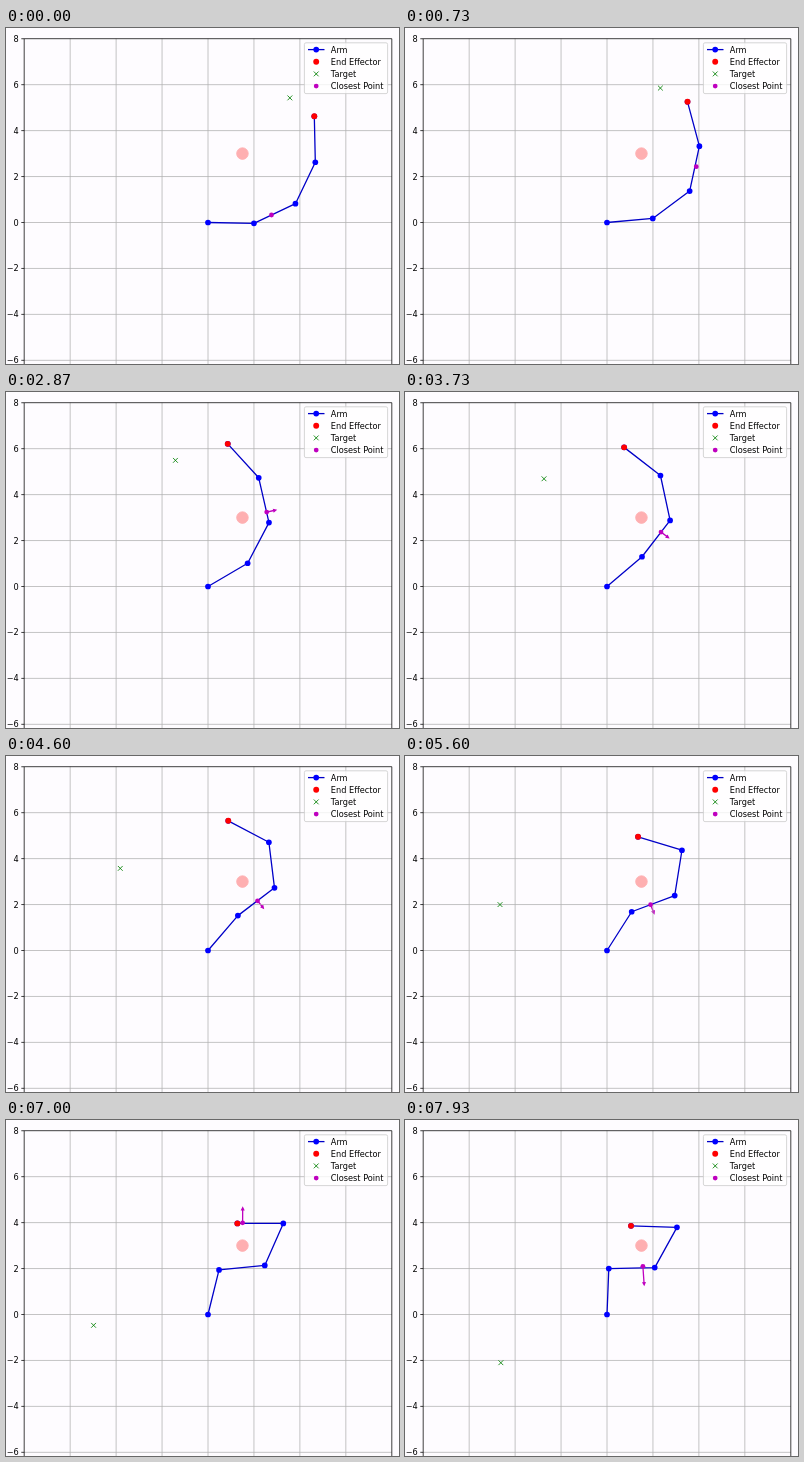
Animation of 393x336 px, one loop 8 s. Source, as an HTML page:

```html
<!DOCTYPE html>
<html lang="en">
<head>
<meta charset="utf-8">
<title>Arm avoiding an obstacle</title>
<style>
  html, body { margin: 0; width: 100%; height: 100%; overflow: hidden; background: #fefcff; }
  svg { display: block; }
  text { font: 8.2px "DejaVu Sans", sans-serif; fill: #000; }
  .grid { stroke: #b0b0b0; stroke-width: .75; }
  .axis { stroke: #000; stroke-width: .75; fill: none; }
  .tick { text-anchor: end; }
  .link { stroke: #0000c8; stroke-width: 1.3; fill: none; stroke-linejoin: round; }
  .joint { fill: #00f; }
  .tip { fill: #f00; }
  .near { fill: #bf00bf; }
  .cross { stroke: #008000; stroke-width: .85; }
  .push { stroke: #bf00bf; stroke-width: 1.3; fill: #bf00bf; }
  .obstacle { fill: #f00; stroke: #f00; stroke-width: .85; opacity: .3; }
  .frame { fill: #fff; fill-opacity: .8; stroke: #ccc; stroke-width: .8; }
</style>
</head>
<body>
<svg id="stage" width="393" height="336" viewBox="0 0 393 336"></svg>
<script>
const UNIT = 22.97, ORIGIN = { x: 202, y: 194.5 };
const LEFT = 18.2, RIGHT = 385.8, TOP = 10.7;
const LINK = 2 * UNIT, LOOP = 8000, STEPS = 120;
const CROSS = 'M-2.4-2.4 2.4 2.4M-2.4 2.4 2.4-2.4';
const FIRST_CONTACT = 105;

// Step, then the absolute angle of each link in degrees.
const POSES = [
  [0, -1, 25.3, 64.4, 91.25],
  [23, 12.5, 48.1, 90.9, 118.6],
  [43, 30.4, 62.3, 102.9, 132.4],
  [69, 49.4, 37.2, 97, 152.2],
  [84, 57.5, 20.6, 80.9, 163],
  [94, 64, 13, 72, 171],
  [105, 76.1, 5.6, 66.2, 180],
  [119, 87.75, 1.25, 61.1, 178.1]
];
// Step and arrow length in pixels.
const PUSHES = [[38, 4], [43, 9.8], [94, 9.8], [105, 15.5], [119, 19]];

const stage = document.getElementById('stage');
const rad = deg => deg * Math.PI / 180;
const at = (x, y) => ({ x: ORIGIN.x + x * UNIT, y: ORIGIN.y - y * UNIT });
const OBSTACLE = at(1.5, 3);

function add(tag, attrs, text) {
  const el = document.createElementNS(stage.namespaceURI, tag);
  set(el, attrs);
  if (text) el.textContent = text;
  return stage.appendChild(el);
}
function set(el, attrs) {
  for (const key in attrs) el.setAttribute(key, attrs[key]);
}
const dot = (cls, r, p = { x: 0, y: 0 }) => add('circle', { class: cls, r, cx: p.x, cy: p.y });
const place = (el, p) => set(el, { cx: p.x, cy: p.y });
const path = (cls, d) => add('path', { class: cls, d });

function segmentOf(keys, n) {
  let i = 0;
  while (i < keys.length - 2 && n >= keys[i + 1][0]) i++;
  return i;
}

function smooth(keys, col, n) {
  const i = segmentOf(keys, n);
  const slope = k => {
    const a = keys[Math.max(k - 1, 0)], b = keys[Math.min(k + 1, keys.length - 1)];
    return (b[col] - a[col]) / (b[0] - a[0]);
  };
  const a = keys[i], b = keys[i + 1], span = b[0] - a[0];
  const u = (n - a[0]) / span, v = 1 - u;
  return v * v * (1 + 2 * u) * a[col] + u * u * (3 - 2 * u) * b[col]
    + span * u * v * (v * slope(i) - u * slope(i + 1));
}

function linear(keys, n) {
  const i = segmentOf(keys, n), [t0, a] = keys[i], [t1, b] = keys[i + 1];
  return a + (b - a) * (n - t0) / (t1 - t0);
}

// Once both sides touch, the push alternates between the last and second link.
const pushesUp = n => n >= FIRST_CONTACT && (n < FIRST_CONTACT + 2 || n % 2 === 0);

function joints(n) {
  const points = [ORIGIN];
  for (let k = 1; k <= 4; k++) {
    let angle = smooth(POSES, k, n);
    if (k === 2 && n > FIRST_CONTACT && pushesUp(n)) angle += 2.4;
    const p = points[k - 1];
    points.push({ x: p.x + LINK * Math.cos(rad(angle)), y: p.y - LINK * Math.sin(rad(angle)) });
  }
  return points;
}

function nearestOn(a, b) {
  const dx = b.x - a.x, dy = b.y - a.y;
  const raw = ((OBSTACLE.x - a.x) * dx + (OBSTACLE.y - a.y) * dy) / (dx * dx + dy * dy);
  const u = Math.min(1, Math.max(0, raw));
  const x = a.x + u * dx, y = a.y + u * dy;
  return { x, y, d: Math.hypot(x - OBSTACLE.x, y - OBSTACLE.y) };
}

function closestPoint(n) {
  const p = joints(Math.max(n - 1, 0));
  const options = [0, 1, 2, 3].map(i => nearestOn(p[i], p[i + 1]));
  if (n >= FIRST_CONTACT) return options[pushesUp(n) ? 3 : 1];
  return options.reduce((best, o) => o.d < best.d ? o : best);
}

function arrowPath(from, length) {
  const ux = (from.x - OBSTACLE.x) / from.d, uy = (from.y - OBSTACLE.y) / from.d;
  const point = (along, side) =>
    `${from.x + ux * along - uy * side} ${from.y + uy * along + ux * side}`;
  const neck = length - 2.5;
  return `M${point(0, 0)}L${point(neck, 0)}L${point(neck, 1)}L${point(length - .5, 0)}`
    + `L${point(neck, -1)}L${point(neck, 0)}Z`;
}

// Plot area
dot('obstacle', 5.8, OBSTACLE);
const arrow = path('push', '');
for (let x = -6; x <= 6; x += 2) path('grid', `M${at(x, 0).x} ${TOP}V336`);
for (let v = -6; v <= 8; v += 2) {
  const y = at(0, v).y;
  if (v < 8) path('grid', `M${LEFT} ${y}H${RIGHT}`);
  path('axis', `M${LEFT - 2.9} ${y}H${LEFT}`);
  add('text', { class: 'tick', x: 12.8, y: y + 3 }, String(v).replace('-', '\u2212'));
}
path('axis', `M${LEFT} 340V${TOP}H${RIGHT}V340`);

// Moving parts
const links = path('link', '');
const dots = [0, 1, 2, 3, 4].map(() => dot('joint', 2.85));
const tip = dot('tip', 2.95);
const target = path('cross', CROSS);
const near = dot('near', 2.4);

// Legend
add('rect', { class: 'frame', x: 298.4, y: 14.8, width: 83.2, height: 50.8, rx: 1.6 });
path('link', 'M302 21.6H318.5');
['Arm', 'End Effector', 'Target', 'Closest Point'].forEach((label, i) => {
  add('text', { x: 324.8, y: 24.6 + 12.1 * i }, label);
});
dot('joint', 2.85, { x: 310.2, y: 21.6 });
dot('tip', 2.95, { x: 310.2, y: 33.8 });
set(path('cross', CROSS), { transform: 'translate(310.2 45.9)' });
dot('near', 2.4, { x: 310.2, y: 58.1 });

function draw(n) {
  const p = joints(n), c = closestPoint(n);
  set(links, { d: 'M' + p.map(q => `${q.x} ${q.y}`).join('L') });
  p.forEach((q, i) => place(dots[i], q));
  place(tip, p[4]);
  place(near, c);

  const phase = rad(64.7 + 1.141 * n);
  const goal = at(1 + 6 * Math.cos(phase), 6 * Math.sin(phase));
  set(target, { transform: `translate(${goal.x} ${goal.y})` });
  set(arrow, { d: n < PUSHES[0][0] ? '' : arrowPath(c, linear(PUSHES, n)) });
}

const start = performance.now();
function tick() {
  const t = (performance.now() - start) % LOOP;
  draw(Math.min(STEPS - 1, Math.floor((t + 4) * STEPS / LOOP)));
  requestAnimationFrame(tick);
}
tick();
</script>
</body>
</html>
```
